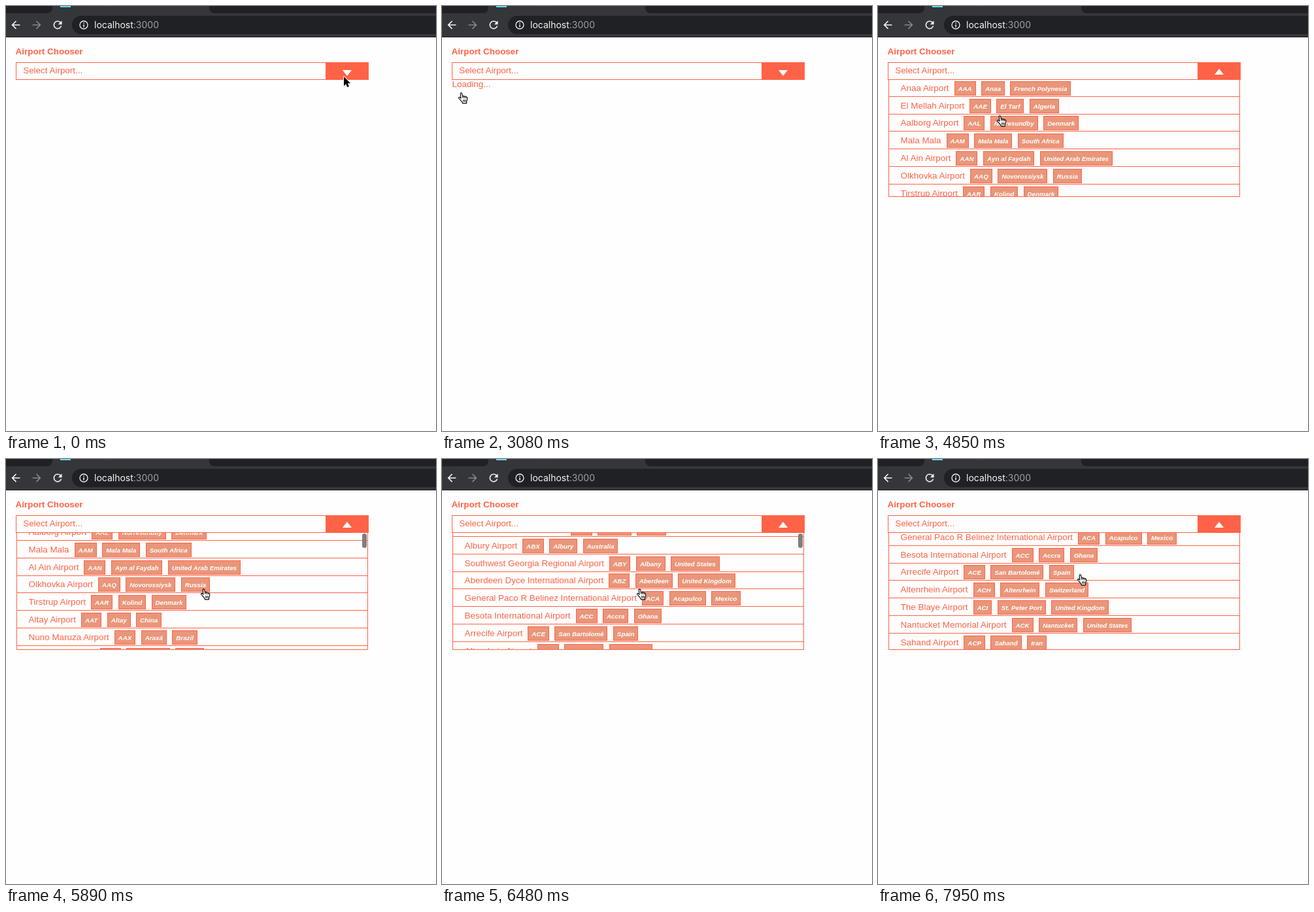
An HTML page that plays this animation: 658x650 px, repeating every 8000 ms.

```html
<!DOCTYPE html>
<html lang="en">
<head>
<meta charset="utf-8">
<title>Airport Chooser</title>
<style>
  html, body { margin: 0; width: 100%; height: 100%; overflow: hidden; background: #fefefe; }
  body { position: relative; color: #ff6347; font: 13.43px/15px "Liberation Sans", Arial, sans-serif; }
  #bar, #select, #button, #list, #thumb, #cursor, .text, .row { position: absolute; }
  #bar { left: 0; top: 0; }
  .text { white-space: pre; }
  #title { left: 14.6px; top: 62px; font-weight: bold; }
  #loading { left: 15.5px; top: 112px; }
  #select { left: 15px; top: 86px; width: 538px; height: 25px; border: 1px solid #ff6347; }
  #select .text { left: 10.2px; top: 4px; }
  #button { right: -1px; top: -1px; width: 66px; height: 27px; background: #ff6347; }
  #list { left: 16px; top: 113px; width: 536px; height: 178px; overflow: hidden;
          border: 1px solid #ff6347; border-top: 0; }
  .row { left: 0; width: 100%; height: 26px; box-sizing: content-box; white-space: nowrap;
         border-bottom: 1px solid #ff6347; }
  .row div { padding: 3px 0 0 17.6px; }
  .tag { display: inline-block; margin: 0 4.3px; padding: 1px 4.9px 0; border: 1px solid #ff6347;
         background: #e9967a; color: #fff; font: italic bold 9.8px/19px "Liberation Sans", Arial, sans-serif; }
  #thumb { left: 545px; top: 114px; width: 7px; height: 22px; border-radius: 3.5px; background: #7f7f7f; }
  #cursor { left: 0; top: 0; overflow: visible; }
</style>
</head>
<body>
<svg id="bar" width="658" height="48">
  <rect width="658" height="48" fill="#35363a"/>
  <rect x="-10" y="-10" width="81" height="21" rx="8" fill="#202124"/>
  <rect x="311" y="-10" width="370" height="21" rx="8" fill="#202124"/>
  <rect x="83" y="-14" width="16" height="16" fill="#61dafb"/>
  <text x="107" y="-1.8" font-family="Inter, sans-serif" font-size="12" fill="#c8cacd">React App</text>
  <rect x="101" y="15" width="600" height="28" rx="14" fill="#202124"/>
  <rect y="47" width="658" height="1" fill="#1f2023"/>
  <g fill="#f1f3f4">
    <path id="back" transform="translate(5.2 19.2) scale(.8125)"
      d="M20 11H7.83l5.59-5.59L12 4l-8 8 8 8 1.41-1.41L7.83 13H20z"/>
    <path transform="translate(56.8 19.2) scale(-.8125 .8125)" fill="#85878b"
      d="M20 11H7.83l5.59-5.59L12 4l-8 8 8 8 1.41-1.41L7.83 13H20z"/>
    <path transform="translate(69.3 19.2) scale(.8125)"
      d="M17.65 6.35A8 8 0 1 0 19.73 14h-2.08A6 6 0 1 1 16.22 7.78L13 11h7V4z"/>
    <path d="M118.3 28.2h1.5v4.2h-1.5zM118.3 25.6h1.5v1.5h-1.5z"/>
  </g>
  <circle cx="119" cy="29" r="6" fill="none" stroke="#f1f3f4" stroke-width="1.3"/>
  <text x="135" y="34" font-family="Inter, sans-serif" font-size="14" fill="#f1f3f4">localhost<tspan fill="#9aa0a6">:3000</tspan></text>
</svg>

<div id="title" class="text">Airport Chooser</div>
<div id="select">
  <div class="text">Select Airport...</div>
  <div id="button"><svg width="66" height="27"><path id="caret" fill="#fff"/></svg></div>
</div>
<div id="loading" class="text">Loading...</div>
<div id="list"></div>
<div id="thumb"></div>

<svg id="cursor" width="20" height="20">
  <g id="arrow">
    <path d="M0 0V14.2L3.2 11.2 5.4 16.2 7.9 15.1 5.8 10.3H10.2Z" fill="#000"
      stroke="#fff" stroke-width="1.8" stroke-linejoin="round" paint-order="stroke"/>
  </g>
  <g id="hand" stroke="#000" stroke-width="1.1" stroke-linejoin="round" stroke-linecap="round">
    <path fill="#fff" d="M4.2 2.2C4 .6 6.2 .4 6.6 2L7.6 6.4C8 5.2 9.8 5.4 10 6.6C10.6 5.6 12.2 6 12.4 7.2
      C13 6.6 14.4 7 14.6 8.2C15 10.5 14.6 12 13.8 13.8L13.4 16.9H7.6C7.2 15 5.4 13.4 4 11.6
      C2.8 10.4 1 9 1.4 8.2C2 7 3.8 7.6 5 9.2Z"/>
    <path fill="none" d="M7.6 6.4L8 8.6M10 6.6L10.3 8.8M12.4 7.2L12.5 9M8.6 11.6V14.4M10.4 11.6V14.4M12.2 11.6V14.4"
      stroke-width=".9"/>
  </g>
</svg>

<script>
const LOOP = 8000, PITCH = 26.8;

const airports = `Anaa Airport|AAA|Anaa|French Polynesia
El Mellah Airport|AAE|El Tarf|Algeria
Aalborg Airport|AAL|Norresundby|Denmark
Mala Mala|AAM|Mala Mala|South Africa
Al Ain Airport|AAN|Ayn al Faydah|United Arab Emirates
Olkhovka Airport|AAQ|Novorossiysk|Russia
Tirstrup Airport|AAR|Kolind|Denmark
Altay Airport|AAT|Altay|China
Nuno Maruza Airport|AAX|Araxá|Brazil
Al Gaidah Airport|AAY|Al Ghaydah|Yemen
Abakan|ABA|Abakan|Russian Federation
Los Llanos|ABC|Albacete|Spain
|ABD|Abadan|Iran
Lehigh Valley International Airport|ABE|Allentown|United States
Abilene Regional Airport|ABI|Abilene|United States
Port Bouet Airport|ABJ|Abidjan|Ivory Coast
Kabri Dar|ABK|Kabri Dar|Ethiopia
Ambler Airport|ABL|Ambler|United States
Bamaga Airport|ABM|Bamaga|Australia
Albuquerque International Airport|ABQ|Albuquerque|United States
Aberdeen Regional Airport|ABR|Aberdeen|United States
Abu Simbel Airport|ABS|Abu Simbel|Egypt
Al Aqiq Airport|ABT|Al Baha|Saudi Arabia
Abuja International Airport|ABV|Gwagwa|Nigeria
Albury Airport|ABX|Albury|Australia
Southwest Georgia Regional Airport|ABY|Albany|United States
Aberdeen Dyce International Airport|ABZ|Aberdeen|United Kingdom
General Paco R Belinez International Airport|ACA|Acapulco|Mexico
Besota International Airport|ACC|Accra|Ghana
Arrecife Airport|ACE|San Bartolomé|Spain
Altenrhein Airport|ACH|Altenrhein|Switzerland
The Blaye Airport|ACI|St. Peter Port|United Kingdom
Nantucket Memorial Airport|ACK|Nantucket|United States
Sahand Airport|ACP|Sahand|Iran`.split("\n");

// [time, cursor kind, x, y]
const moves = [
  [0, "arrow", 517, 108], [390, "arrow", 518, 105], [530, "hand", 515, 102],
  [1730, "arrow", 200, 174], [1880, "arrow", 13, 157], [2180, "hand", 24, 132],
  [3670, "hand", 40, 150], [3820, "hand", 75, 185], [3970, "hand", 115, 220],
  [4110, "hand", 155, 236], [4260, "hand", 195, 228], [4400, "hand", 206, 195],
  [4550, "hand", 196, 168], [4700, "hand", 178, 152], [4850, "hand", 181, 167],
  [5000, "hand", 189, 178], [5290, "hand", 215, 186], [5440, "hand", 265, 196],
  [5590, "hand", 297, 198], [7370, "hand", 290, 195], [7510, "hand", 286, 187],
  [7650, "hand", 290, 180], [7800, "hand", 298, 177], [7950, "hand", 304, 176]
];
// [time, scroll offset]
const scrolls = [[0, 0], [5890, 67.5], [6040, 148], [6180, 205.5], [6330, 440], [6480, 636.3], [6620, 729.6]];

const $ = id => document.getElementById(id);
const show = (id, on) => { $(id).style.display = on ? "" : "none"; };
const at = (keys, t) => keys.findLast(k => k[0] <= t);

const rows = airports.map(line => {
  const [name, ...tags] = line.split("|");
  const row = document.createElement("div");
  row.className = "row";
  row.innerHTML = `<div>${name} ${tags.map(s => `<span class="tag">${s}</span>`).join("")}</div>`;
  $("list").append(row);
  return row;
});

function draw(t) {
  const open = t >= 3220;
  show("loading", t >= 830 && !open);
  show("list", open);
  show("thumb", t >= 5890 && t < 7220);
  $("caret").setAttribute("d", open ? "M26 19H40L33 10Z" : "M26 12H40L33 21Z");

  const offset = at(scrolls, t)[1];
  rows.forEach((row, i) => {
    row.style.top = Math.floor(138.3 + i * PITCH - offset) - 139 + "px";
  });

  const [, kind, x, y] = at(moves, t);
  show("arrow", kind === "arrow");
  show("hand", kind === "hand");
  $("cursor").style.transform = `translate(${x}px, ${y}px)`;
}

const start = performance.now();
function tick() {
  draw((performance.now() - start) % LOOP);
  requestAnimationFrame(tick);
}
tick();
</script>
</body>
</html>
```
